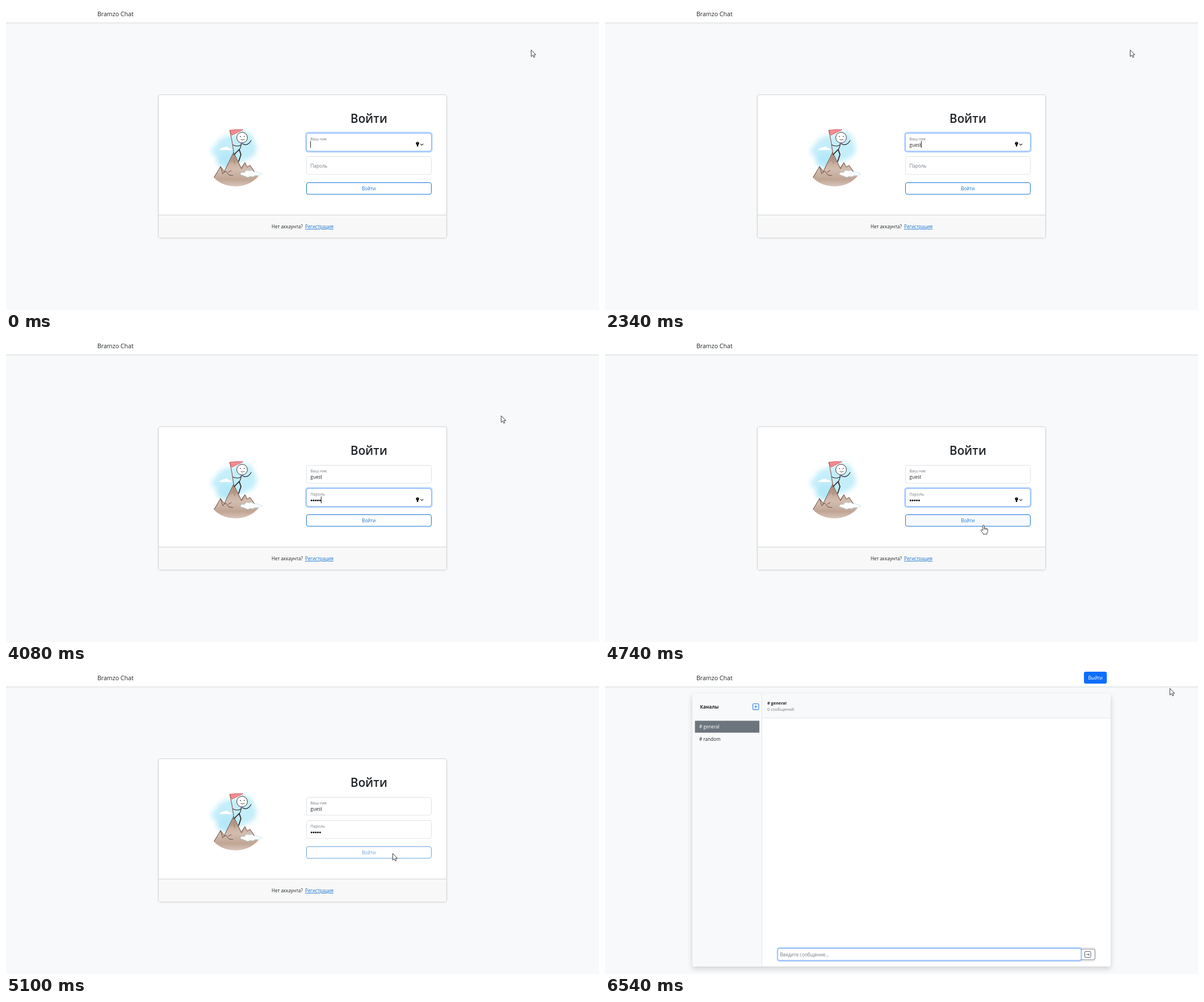
Write an HTML page that moves like this. It is 1045 px wide and 536 px high and loops after 6570 ms.

```html
<!DOCTYPE html>
<html lang="ru">
<head>
<meta charset="utf-8">
<title>Chat</title>
<style>
  html, body { margin: 0; width: 100%; height: 100%; overflow: hidden; background: #f8f9fa; }
  svg { display: block; width: 100vw; height: 100vh; }
  text { font: 8.15px "Open Sans", "Noto Sans", sans-serif; fill: #212529; white-space: pre; }
  .mid { text-anchor: middle; }
  .muted { fill: #757a80; }
  .line { fill: none; stroke: #2b2326; stroke-linecap: round; stroke-linejoin: round; }
  .field { fill: #fff; stroke: #dee2e6; }
  .ring { fill: none; stroke: #0d6efd; stroke-opacity: .27; stroke-width: 2.4; }
  .focus { fill: none; stroke: #86b7fe; }
  .blue { stroke: #1673d2; }
</style>
</head>
<body>
<svg viewBox="0 0 1045 536">
  <defs>
    <filter id="soft" x="-20%" y="-20%" width="140%" height="140%"><feGaussianBlur stdDeviation="4"/></filter>
    <filter id="navShadow" x="-5%" y="-50%" width="110%" height="250%"><feDropShadow dx="0" dy="1" stdDeviation="1" flood-opacity=".13"/></filter>
    <filter id="cardShadow" x="-5%" y="-5%" width="110%" height="115%"><feDropShadow dx="0" dy="1" stdDeviation="1.2" flood-opacity=".12"/></filter>
    <filter id="chatShadow" x="-5%" y="-5%" width="110%" height="115%"><feDropShadow dx="0" dy="4" stdDeviation="5" flood-opacity=".17"/></filter>
    <linearGradient id="rock" x1="0" y1="0" x2="0" y2="1">
      <stop offset="0" stop-color="#b39583"/><stop offset=".5" stop-color="#d3bdb0"/>
      <stop offset=".8" stop-color="#c0a594"/><stop offset="1" stop-color="#d8c5ba"/>
    </linearGradient>
    <g id="key">
      <circle cx="725.2" cy="242.3" r="2.7"/><path d="M724 243h2.4v4l-1.2 1.3-1.2-1.3z"/>
      <circle cx="725.2" cy="241.4" r=".6" fill="#fff"/>
      <path d="M730.3 243l2.5 2.3 2.5-2.3" fill="none" stroke="#222" stroke-width="1.1"/>
    </g>
  </defs>

  <rect width="1045" height="536" fill="#f8f9fa"/>
  <rect x="-5" y="-5" width="1055" height="34" fill="#fff" filter="url(#navShadow)"/>
  <text x="161" y="18" style="font-size:10.6px">Bramzo Chat</text>

  <g id="login">
    <rect x="268.5" y="156.5" width="508" height="252" rx="3.5" fill="#fff" stroke="#d3d4d6" filter="url(#cardShadow)"/>
    <path d="M269 368.5h507v37q0 3-3 3H272q-3 0-3-3z" fill="#f8f8f8"/>
    <path d="M269 368.5h507" stroke="#d3d4d6"/>

    <g id="picture">
      <g filter="url(#soft)" fill="#c3eefa">
        <ellipse cx="405" cy="251" rx="37" ry="24"/>
        <ellipse cx="380" cy="256" rx="18" ry="12"/>
        <ellipse cx="420" cy="239" rx="17" ry="18"/>
        <ellipse cx="391" cy="272" rx="20" ry="14" fill="#b4e8f8"/>
      </g>
      <path d="M376 254q-1-3 4-3 1-3 5-2 4-3 7 1 5 0 6 4z" fill="#fff" stroke="#d8e6ec" stroke-width=".5"/>
      <path d="M366 302L378 283l7 8L401 258l13 26 7-8 4 8 5-3 15 19q-15 17-39 18-26 0-40-16z" fill="url(#rock)"/>
      <path d="M401 260l-7 18 5-5 4 7 2-6 5 7z" fill="#a98673" opacity=".55"/>
      <path class="line" d="M367 302l11-19 6 8m-6-8 4 13 5-5 6 7 7 1M384 293l17-35 14 29 6-11 4 8 5-3 7 10M392 293l5-3" style="stroke:#704d40;stroke-width:1"/>
      <path d="M413 297q1-5 7-3 3-6 9-3 5-3 8 2 5-2 7 1 6-1 7 3-5 0-8 2-5-1-8 2-5-2-9 1-4-2-13-5z" fill="#fff" stroke="#b9dceb" stroke-width=".8"/>
      <path d="M394 219q11-2 24-1l-12 6-8 4z" fill="#f58b90" stroke="#bd5359" stroke-width=".7"/>
      <path class="line" d="M394.5 219.5Q399 240 401.5 260" style="stroke:#8e4b45;stroke-width:1.1"/>
      <circle cx="416" cy="232" r="9.4" fill="#fff" class="head" stroke="#3a3437" stroke-width="1"/>
      <circle cx="413.3" cy="230.2" r=".8"/><circle cx="419.8" cy="230" r=".8"/>
      <path class="line" d="M414 235.5q3 2 6-.3" stroke-width=".8"/>
      <path class="line" d="M415 242q-1 7-4 12M414 245q-6 4-14 0M416 243q10 5 16-6" stroke-width="1.1"/>
      <path class="line" d="M411 253l-5 5-4 4M411 253l3 9-2 6-2 6" stroke-width="1.7"/>
      <path d="M413 241l2.5 1.5 3-1-1 2.6-2-1-2.2.7z" fill="#8e7bb4"/>
    </g>

    <text class="mid" x="639.5" y="206" style="font-size:20.7px;font-weight:600">Войти</text>

    <rect class="field" x="529.5" y="224.5" width="220" height="31.5" rx="3.3"/>
    <g id="nickFocus">
      <rect class="ring" x="528.3" y="223" width="222.4" height="34.2" rx="4.4"/>
      <rect class="focus" x="529.5" y="224.5" width="220" height="31.5" rx="3.3"/>
      <use href="#key"/>
    </g>
    <text class="muted" x="536.5" y="237" style="font-size:7px">Ваш ник</text>
    <text id="nick" x="536.5" y="248"></text>

    <rect class="field" x="529.5" y="265.5" width="220" height="31.5" rx="3.3"/>
    <g id="passFocus">
      <rect class="ring" x="528.3" y="264" width="222.4" height="34.2" rx="4.4"/>
      <rect class="focus" x="529.5" y="265.5" width="220" height="31.5" rx="3.3"/>
      <use href="#key" y="41.3"/>
    </g>
    <text class="muted" id="passLabel" x="536.5">Пароль</text>
    <g id="dots"></g>
    <rect id="caret" width="1" height="12" fill="#222"/>

    <g id="submit">
      <rect id="submitBox" class="blue" x="529.5" y="311.5" width="220" height="20.5" rx="3.3"/>
      <text id="submitText" class="mid" x="639.3" y="325">Войти</text>
    </g>

    <text x="468" y="392">Нет аккаунта?</text>
    <text x="527" y="392" style="fill:#1170cf;text-decoration:underline">Регистрация</text>
  </g>

  <g id="logout">
    <rect x="844" y="3" width="40.3" height="21" rx="3.3" fill="#0d6efd"/>
    <text class="mid" x="864.2" y="17" style="fill:#fff">Выйти</text>
  </g>

  <g id="chat">
    <rect x="154" y="42" width="737" height="480.5" rx="3" fill="#fff" filter="url(#chatShadow)"/>
    <path d="M157 42H276.5V522.5H157q-3 0-3-3V45q0-3 3-3z" fill="#f8f9fa"/>
    <path d="M277 42H888q3 0 3 3V84.5H277z" fill="#f8f9fa"/>
    <path d="M276.5 42V522.5M277 84.5H891" stroke="#e3e5e8" fill="none"/>
    <text x="167.5" y="68.3" style="font-weight:700">Каналы</text>
    <rect x="260.5" y="59.5" width="10.4" height="10.4" rx="1.5" fill="none" stroke="#2f81e8" stroke-width="1.1"/>
    <path d="M265.7 62v5.4M263 64.7h5.4" stroke="#2f81e8"/>
    <rect x="158.5" y="89.5" width="113.5" height="21" fill="#6c757d"/>
    <text x="166" y="103.3" style="fill:#fff"># general</text>
    <text x="166" y="124.6"># random</text>
    <text x="286" y="60.5" style="font-size:7.3px;font-weight:700"># general</text>
    <text class="muted" x="286" y="72.3" style="font-size:7.3px">0 сообщений</text>
    <rect class="field" x="304.5" y="489.5" width="559" height="24" rx="3.3"/>
    <path d="M838 492H860.5q3 0 3 3v13q0 3-3 3H838" fill="none" stroke="#777d83"/>
    <rect x="845.5" y="496.3" width="10.6" height="10.6" rx="1.5" fill="none" stroke="#555b61"/>
    <path d="M848 501.6h5.5m-2.2-2.2 2.2 2.2-2.2 2.2" fill="none" stroke="#555b61" stroke-width=".9"/>
    <path d="M838.2 493v2M838.2 508.5v2" stroke="#777d83"/>
    <g id="chatFocus">
      <rect x="304.5" y="491" width="534.5" height="21" rx="3" fill="#fff"/>
      <rect class="ring" x="303.7" y="490.3" width="536" height="22.4" rx="3.8"/>
      <rect class="focus" x="304.5" y="491" width="534.5" height="21" rx="3"/>
    </g>
    <text class="muted" x="308.5" y="505">Введите сообщение...</text>
    <rect id="chatCaret" x="308.5" y="495.5" width="1" height="12" fill="#222"/>
  </g>

  <g id="cursor" fill="#fff" stroke="#2c2c2c" stroke-width=".9" stroke-linejoin="round">
    <path id="arrow" d="M.5.5V12.2L3.2 9.7 5.1 13.7 7 12.9 5.1 9H8.8z"/>
    <path id="hand" d="M-1.3 9.5V1.3Q-1.2 0 0 0T1.3 1.3V5.2Q2.6 4.4 3.6 5.6 4.9 5 5.6 6.2 7.3 5.8 7.4 7.6V10.5Q7.3 12.4 6 14V16H-.6V14.5Q-2.4 12.8-4.4 9.4-4.8 8-3.5 8-2.4 8.2-1.3 9.5zM1.3 5.2V8M3.6 5.8V8M5.6 6.4V8.3"/>
  </g>
</svg>

<script>
const LOOP = 6570, NAME = 'guest';
const SWITCH = 2790, HOVER = 4728, CLICK = 4905, LEAVE = 5250, CHAT = 5580;
const nameKeys = [1680, 1830, 1980, 2130, 2310];
const passKeys = [3360, 3480, 3600, 3720, 3840];
// time, x, y
const path = [
  [0, 925, 77], [3930, 925, 77], [4110, 862, 148], [4350, 733, 278], [4560, 664, 344],
  [4670, 663, 342], [4740, 667, 330], [4890, 672, 328], [5010, 681, 323], [5160, 681, 323],
  [5400, 752, 300], [5610, 834, 260], [5940, 882, 214], [6300, 964, 90], [6480, 995, 32], [LOOP, 995, 32]
];

const el = {};
document.querySelectorAll('svg [id]').forEach(node => el[node.id] = node);
const set = (node, attrs) => { for (const k in attrs) node.setAttribute(k, attrs[k]); };
const show = (node, on) => node.style.display = on ? '' : 'none';
const ramp = (t, from, span) => {
  const p = Math.max(0, Math.min(1, (t - from) / span));
  return p * p * (3 - 2 * p);
};
const mix = (a, b, p) => `rgb(${a.map((v, i) => Math.round(v + (b[i] - v) * p))})`;
const typed = (keys, t) => keys.filter(k => k <= t).length;
const blink = (t, since) => (t - since) % 1060 < 530;

passKeys.forEach((_, i) => {
  const dot = document.createElementNS('http://www.w3.org/2000/svg', 'circle');
  set(dot, { cx: 538.4 + i * 3.75, cy: 286.4, r: 1.45 });
  el.dots.append(dot);
});

function pointer(t) {
  const i = Math.max(1, path.findIndex(p => p[0] > t));
  const [t0, x0, y0] = path[i - 1], [t1, x1, y1] = path[i];
  const p = (t - t0) / (t1 - t0);
  return [x0 + (x1 - x0) * p, y0 + (y1 - y0) * p];
}

function drawLogin(t) {
  const letters = typed(nameKeys, t), dots = typed(passKeys, t);
  const inPass = t >= SWITCH;
  el.nick.textContent = NAME.slice(0, letters);
  [...el.dots.children].forEach((dot, i) => show(dot, i < dots));

  el.nickFocus.style.opacity = 1 - ramp(t, SWITCH, 150);
  el.passFocus.style.opacity = ramp(t, SWITCH, 150) * (1 - ramp(t, CLICK, 150));
  const lift = ramp(t, SWITCH, 100);
  el.passLabel.setAttribute('y', 284.8 - 6.5 * lift);
  el.passLabel.style.fontSize = 8.15 - 1.15 * lift + 'px';

  const last = [-160, ...nameKeys, SWITCH, ...passKeys].filter(k => k <= t).pop();
  const offset = inPass ? dots * 3.75 : letters && el.nick.getComputedTextLength();
  set(el.caret, { x: 536.2 + offset, y: inPass ? 279.5 : 238 });
  show(el.caret, t < CLICK && blink(t, last));

  const fill = ramp(t, HOVER, 110) * (1 - ramp(t, CLICK, 150));
  el.submitBox.style.fill = mix([255, 255, 255], [13, 110, 253], fill);
  el.submitText.style.fill = mix([22, 115, 210], [255, 255, 255], fill);
  el.submit.style.opacity = t < CLICK ? 1 : .65;
}

function draw(t) {
  show(el.login, t < LEAVE);
  show(el.logout, t >= LEAVE);
  show(el.chat, t >= CHAT);
  if (t < LEAVE) drawLogin(t);
  el.chatFocus.style.opacity = ramp(t, CHAT + 30, 150);
  show(el.chatCaret, blink(t, CHAT));

  const [x, y] = pointer(t), over = t >= HOVER && t < CLICK;
  el.cursor.setAttribute('transform', `translate(${x} ${y})`);
  show(el.arrow, !over);
  show(el.hand, over);
}

const start = performance.now();
function tick() {
  draw((performance.now() - start) % LOOP);
  requestAnimationFrame(tick);
}
tick();
</script>
</body>
</html>
```
